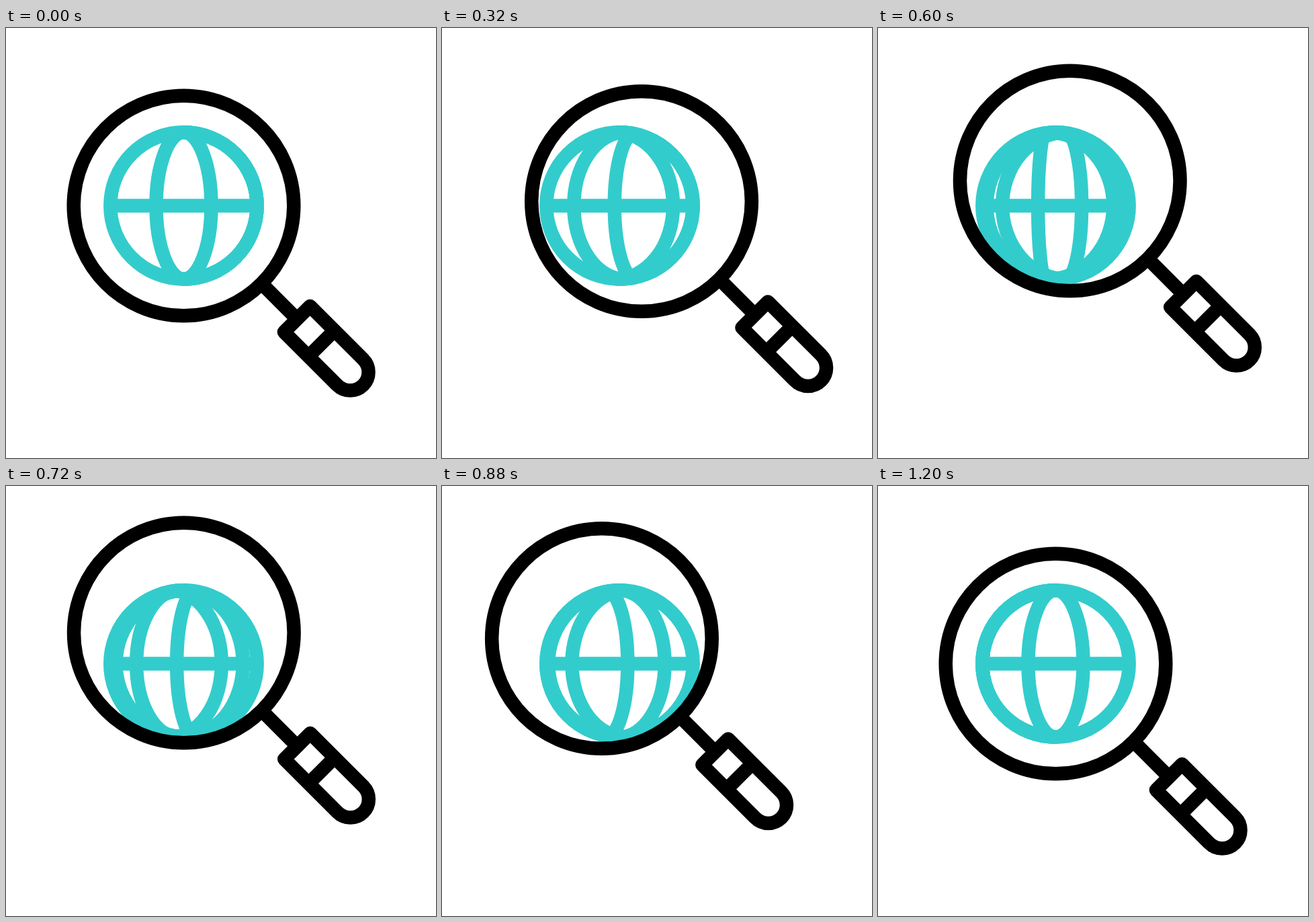
These frames come from a looping animation (640x640 px, 1.6 s). An HTML page with a canvas:

```html
<!DOCTYPE html>
<html>
<head>
<meta charset="utf-8">
<style>
html, body { margin: 0; overflow: hidden; background: #fff; }
canvas { display: block; }
</style>
</head>
<body>
<canvas width="640" height="640"></canvas>
<script>
const ctx = document.querySelector('canvas').getContext('2d');
const CENTER = 264.5, GLOBE = 109.2, REST = 41, LENS = 163.8, STROKE = 20.48;
const GRIP = 27.3, GRIP_START = 238.6, GRIP_BAND = 290, GRIP_END = 350.4;
const LOOP = 1600, STEP = 20;

// Points the lens drifts through: time and offset from its resting place
const lensPath = [
  { t: 0, x: 0, y: 0 }, { t: 320, x: 32.5, y: -6.5 }, { t: 480, x: 35.5, y: -22.5 },
  { t: 720, x: 0.3, y: -46 }, { t: 880, x: -26.6, y: -37.5 },
  { t: 1040, x: -21.3, y: -15.5 }, { t: 1200, x: 0, y: 0 }
];

// Each meridian eases leftwards once; bow is how far its poles lean mid-way
const meridians = [
  { from: -REST, to: -GLOBE, start: 0, time: 740, bow: 8 },
  { from: REST, to: -GLOBE, start: 0, time: 840, bow: 27 },
  { from: GLOBE, to: -GLOBE, start: 135, time: 800, bow: -16 },
  { from: GLOBE, to: -GLOBE, start: 300, time: 790, bow: 18 },
  { from: GLOBE, to: -REST, start: 400, time: 800, bow: -22 },
  { from: GLOBE, to: REST, start: 440, time: 760, bow: 0 }
];

const clamp01 = u => Math.max(0, Math.min(1, u));
const smooth = u => u * u * (3 - 2 * u);

// Smooth curve through the lens points along one axis
function lensOffset(t, axis) {
  const last = lensPath.length - 1;
  const span = i => lensPath[i + 1].t - lensPath[i].t;
  const slope = i => (lensPath[i + 1][axis] - lensPath[i][axis]) / span(i);
  const tangent = i => {
    if (i === 0) return 1.5 * slope(0) - 0.5 * tangent(1);
    if (i === last) return 1.5 * slope(last - 1) - 0.5 * tangent(last - 1);
    return (slope(i - 1) * span(i) + slope(i) * span(i - 1)) / (span(i - 1) + span(i));
  };
  if (t >= lensPath[last].t) return 0;
  const i = lensPath.findIndex(p => p.t > t) - 1;
  const u = (t - lensPath[i].t) / span(i), v = 1 - u;
  return smooth(v) * lensPath[i][axis] + smooth(u) * lensPath[i + 1][axis]
    + span(i) * u * v * (v * tangent(i) - u * tangent(i + 1));
}

function ring(r) {
  ctx.beginPath();
  ctx.arc(0, 0, r, 0, 2 * Math.PI);
  ctx.stroke();
}

function line(x1, y1, x2, y2) {
  ctx.beginPath();
  ctx.moveTo(x1, y1);
  ctx.lineTo(x2, y2);
  ctx.stroke();
}

function drawMeridian({ from, to, start, time, bow }, t) {
  const p = smooth(clamp01((t - start) / time));
  const x = from + (to - from) * p;
  const pole = bow * Math.sin(Math.PI * p);
  ctx.beginPath();
  ctx.ellipse(pole, 0, Math.abs(x - pole), GLOBE, 0, -Math.PI / 2, Math.PI / 2, x < pole);
  ctx.stroke();
}

function drawGlobe(t) {
  ctx.save();
  ctx.translate(CENTER, CENTER);
  ctx.strokeStyle = '#33cccc';
  ring(GLOBE);
  ctx.beginPath();
  ctx.arc(0, 0, GLOBE + STROKE / 2, 0, 2 * Math.PI);
  ctx.clip();
  line(-GLOBE, 0, GLOBE, 0);
  for (const meridian of meridians) drawMeridian(meridian, t);
  ctx.restore();
}

function drawLens(t) {
  ctx.save();
  ctx.translate(CENTER + lensOffset(t, 'x'), CENTER + lensOffset(t, 'y'));
  ctx.rotate(Math.PI / 4);
  ctx.strokeStyle = '#000';
  ring(LENS);
  line(LENS, 0, GRIP_START, 0);
  line(GRIP_BAND, -GRIP, GRIP_BAND, GRIP);
  ctx.beginPath();
  ctx.moveTo(GRIP_START, GRIP);
  ctx.lineTo(GRIP_START, -GRIP);
  ctx.arc(GRIP_END, 0, GRIP, -Math.PI / 2, Math.PI / 2);
  ctx.closePath();
  ctx.stroke();
  ctx.restore();
}

function frame() {
  const t = Math.floor(performance.now() % LOOP / STEP) * STEP;
  ctx.clearRect(0, 0, 640, 640);
  ctx.lineWidth = STROKE;
  ctx.lineJoin = 'round';
  drawGlobe(t);
  drawLens(t);
  requestAnimationFrame(frame);
}
frame();
</script>
</body>
</html>
```
